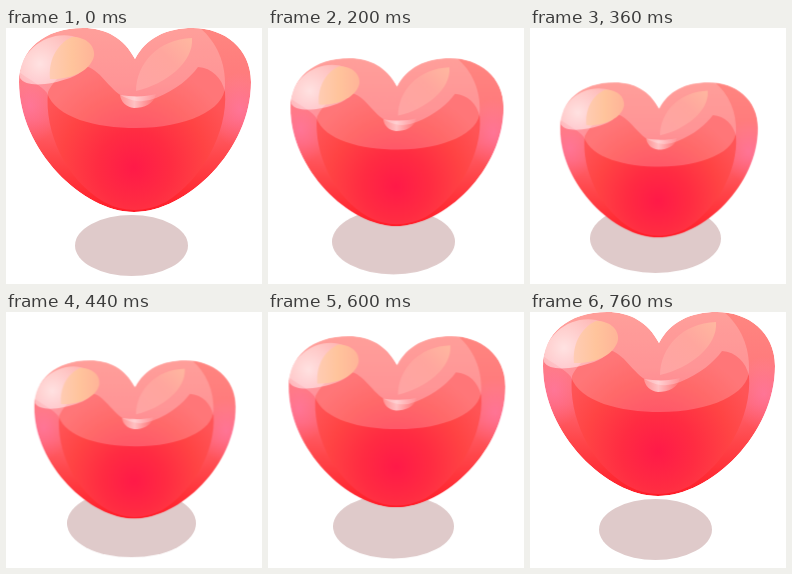
Write an HTML page that moves like this. It is 256x256 px and loops after 0.8 s.

```html
<!DOCTYPE html>
<html lang="en">
<head>
<meta charset="utf-8">
<title>Bouncing heart</title>
<style>
  html, body { margin: 0; width: 100%; height: 100%; overflow: hidden; background: #fff; }
  svg { display: block; width: 100vw; height: 100vh; }
  #heart { transform-origin: 129px 1px; }
  #shadow { transform-origin: 125.5px 217.5px; }
</style>
</head>
<body>
<svg viewBox="0 0 256 256">
  <defs>
    <path id="outline" d="M129 31C118 10 100 0 77 0C38 0 13 22 13 54C13 122 77 184 128 184C181 184 245 122 245 54C245 20 218 0 187 0C160 0 140 10 129 31Z"/>
    <clipPath id="inside"><use href="#outline"/></clipPath>
    <linearGradient id="glass" x1="0" y1="0" x2="0" y2="1">
      <stop offset="0" stop-color="#ff8680"/>
      <stop offset=".3" stop-color="#ff7a7c"/>
      <stop offset=".5" stop-color="#ff6670"/>
      <stop offset=".7" stop-color="#ff464a"/>
      <stop offset="1" stop-color="#ff1c28"/>
    </linearGradient>
    <radialGradient id="liquid" gradientUnits="userSpaceOnUse" cx="128" cy="140" r="105">
      <stop offset="0" stop-color="#ff1a48"/>
      <stop offset=".35" stop-color="#ff2c42"/>
      <stop offset=".7" stop-color="#ff4444"/>
      <stop offset="1" stop-color="#ff5456"/>
    </radialGradient>
    <radialGradient id="rim">
      <stop offset="0" stop-color="#ff80c0" stop-opacity=".45"/>
      <stop offset="1" stop-color="#ff80c0" stop-opacity="0"/>
    </radialGradient>
    <radialGradient id="shine" gradientUnits="userSpaceOnUse" cx="34" cy="36" r="52">
      <stop offset="0" stop-color="#fff" stop-opacity=".72"/>
      <stop offset=".5" stop-color="#fff" stop-opacity=".45"/>
      <stop offset="1" stop-color="#fff" stop-opacity=".15"/>
    </radialGradient>
    <linearGradient id="gold" x1="0" y1="0" x2="1" y2="0">
      <stop offset="0" stop-color="#ffccb4"/>
      <stop offset=".5" stop-color="#ffc49c"/>
      <stop offset="1" stop-color="#ffb498"/>
    </linearGradient>
    <linearGradient id="petal" x1="0" y1="1" x2="1" y2="0">
      <stop offset="0" stop-color="#ffa4a4"/>
      <stop offset=".6" stop-color="#ffa69e"/>
      <stop offset="1" stop-color="#ffb8a0"/>
    </linearGradient>
    <linearGradient id="dimple" x1="0" y1="0" x2="1" y2="0">
      <stop offset="0" stop-color="#fff" stop-opacity=".3"/>
      <stop offset=".4" stop-color="#fff" stop-opacity=".6"/>
      <stop offset="1" stop-color="#fff" stop-opacity=".05"/>
    </linearGradient>
  </defs>

  <ellipse id="shadow" cx="125.5" cy="217.5" rx="56.5" ry="30.5" fill="#dfcaca"/>

  <g id="heart">
    <g clip-path="url(#inside)">
      <use href="#outline" fill="url(#glass)"/>
      <ellipse cx="24" cy="78" rx="30" ry="38" fill="url(#rim)"/>
      <ellipse cx="234" cy="82" rx="30" ry="38" fill="url(#rim)"/>
      <path fill="url(#liquid)" d="M42 64C50 48 64 38 78 38C94 40 103 62 118 69Q134 77 150 70C170 62 184 50 192 39C206 40 216 50 219 64C222 104 196 152 160 174Q128 190 98 174C60 152 38 104 42 64Z"/>
      <path fill="#fff" fill-opacity=".2" d="M13 44C24 52 36 58 41 65C50 90 90 100 130 100C180 100 219 82 219 58C220 36 211 14 194 0H13Z"/>
      <path fill="url(#shine)" d="M14 50C12 26 38 3 66 8C94 14 88 42 64 50C44 57 20 60 14 50Z"/>
      <path fill="url(#gold)" d="M44 51C42 34 50 16 66 9C80 9 89 17 88 28C85 42 66 52 44 51Z"/>
      <path fill="url(#petal)" d="M130 63C130 36 152 11 186 10C188 34 160 56 130 63Z"/>
      <path fill="url(#dimple)" d="M114 67C126 69 140 69 150 66C148 76 138 80 128 80C120 79 115 74 114 67Z"/>
    </g>
  </g>
</svg>
<script>
  // Ten even steps down, the same ten back up.
  function bounce(id, up, down) {
    const easing = 'steps(10, jump-none)';
    document.getElementById(id).animate([
      { transform: up, offset: 0, easing },
      { transform: down, offset: .5, easing },
      { transform: up, offset: 1 }
    ], { duration: 800, iterations: Infinity, delay: -1 });
  }

  bounce('heart', 'translateY(0px) scale(1, 1)', 'translateY(54px) scale(.8545, .845)');
  bounce('shadow', 'translateY(0px) scale(1, 1)', 'translateY(-7px) scale(1.159, 1.131)');
</script>
</body>
</html>
```
